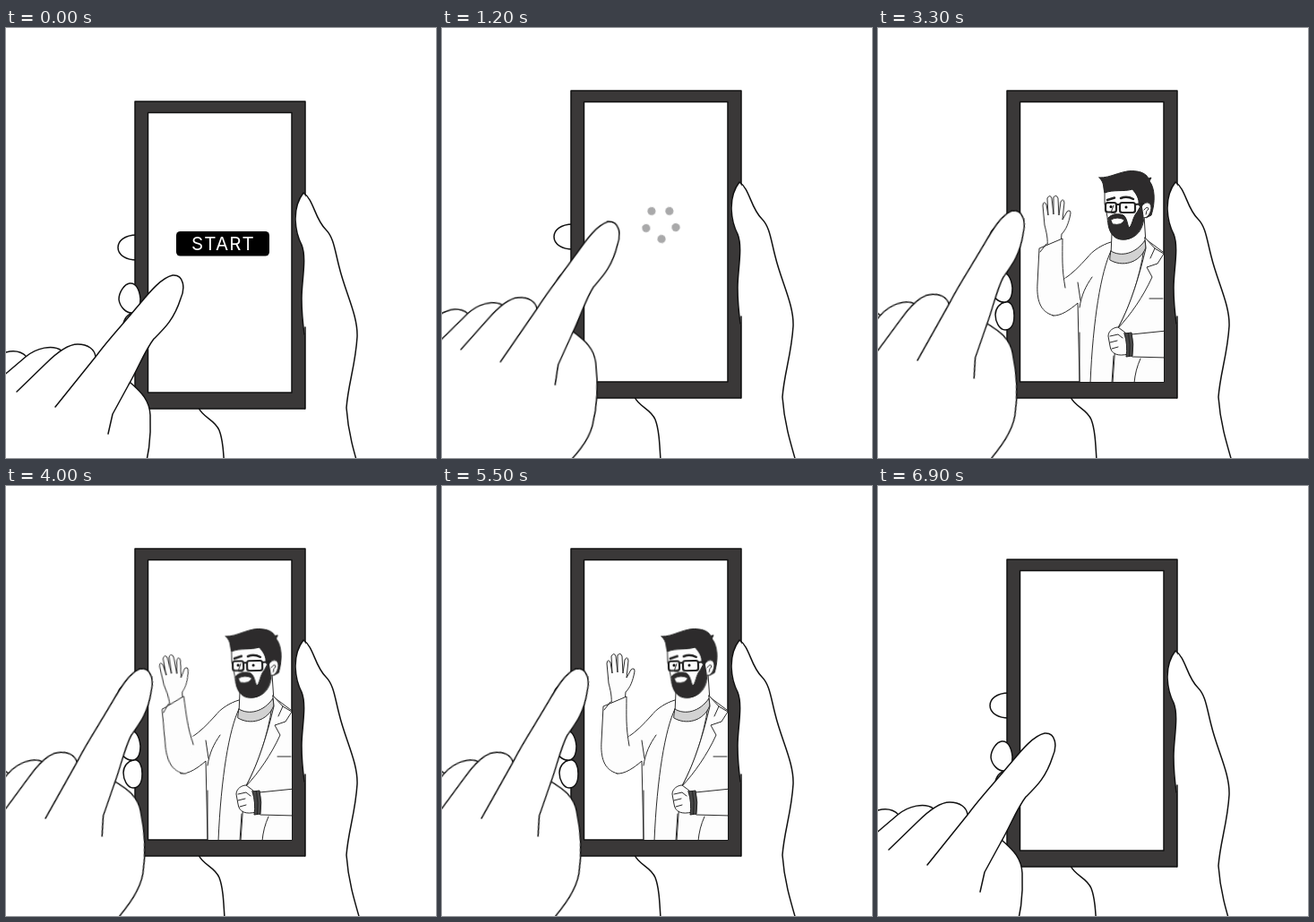
Write an HTML page that moves like this. It is 480 by 480 pixels and loops after 7 s.

```html
<!DOCTYPE html>
<html lang="en">
<head>
<meta charset="utf-8">
<title>Video call</title>
<style>
html, body { margin: 0; width: 100%; height: 100%; overflow: hidden; background: #fff; }
svg { display: block; width: 100vw; height: 100vh; }
path, rect { stroke-linejoin: round; stroke-linecap: round; }
.line { fill: #fff; stroke: #111; stroke-width: 1.5; }
.thin { fill: #fdfdfd; stroke: #2a2a2a; stroke-width: 1; }
.dark { fill: #2d2b2c; stroke: #222; stroke-width: 1; }
.open { fill: none; }
.bare { stroke: none; }
.collar { fill: #d2d2d2; }
text { font: 400 20.5px Inter, "Open Sans", sans-serif; letter-spacing: 1.2px; fill: #fff; text-anchor: middle; }

#device, #button, #loader, #man, #forearm, #head, #tap { animation: 7s ease-in-out infinite; }
#device { animation-name: lift; }
#button { animation-name: press; transform-origin: 242px 228.7px; }
#loader { animation-name: load; animation-timing-function: linear; }
#dots { animation: spin 1s linear infinite; transform-origin: 244px 218px; }
#man { animation-name: call; animation-timing-function: linear; }
#forearm { animation-name: wave; transform-origin: 194px 310px; }
#head { animation-name: nod; transform-origin: 282px 238px; }
#tap { animation-name: tap; transform-origin: 216px 226px; }

@keyframes lift {
  0%, 97.1%, 100% { transform: translateY(12px); }
  7.1%, 91.5% { transform: none; }
}
@keyframes press {
  0%, 5% { transform: none; opacity: 1; }
  8.3%, 9.3% { transform: translateY(3.8px) scale(.835); opacity: 1; }
  12.2% { transform: none; opacity: 1; }
  15%, 100% { transform: none; opacity: 0; }
}
@keyframes load {
  0%, 15.7% { opacity: 0; }
  18.5%, 37% { opacity: 1; }
  39%, 100% { opacity: 0; }
}
@keyframes spin { to { transform: rotate(360deg); } }
@keyframes call {
  0%, 38.6% { opacity: 0; }
  41.4%, 91.4% { opacity: 1; }
  94.3%, 100% { opacity: 0; }
}
@keyframes wave {
  0%, 46.8%, 61.4%, 78.6%, 100% { transform: translate(0, 0) rotate(0deg); }
  54%, 69%, 88% { transform: translate(5px, 1px) rotate(-13deg); }
}
@keyframes nod {
  0%, 47.1%, 88.6%, 100% { transform: none; }
  68.6% { transform: rotate(-3deg); }
}
@keyframes tap {
  0%, 97.1%, 100% { transform: translate(-28px, 50px) rotate(0deg); }
  8.3%, 12.1% { transform: translate(0, 0) rotate(0deg); }
  22.9%, 91.4% { transform: translate(-65px, -22px) rotate(-9.5deg); }
}
</style>
</head>
<body>
<svg viewBox="0 0 480 480">
  <defs>
    <clipPath id="screen"><rect x="159" y="83" width="160" height="312"/></clipPath>
  </defs>

  <g id="device">
    <!-- holding hand behind the phone -->
    <path class="line" d="M146 219C132 219 125 226 125 233C125 242 135 247 146 247"/>
    <path class="line open" d="M215 412C220 423 233 425 238 437C243 450 243 468 245 500"/>

    <rect x="144" y="70" width="190" height="343" fill="#3a3838" stroke="#111" stroke-width="1.5"/>
    <rect class="line" x="158.5" y="82.5" width="160.5" height="312.5"/>

    <g clip-path="url(#screen)">
      <g id="button">
        <rect x="190" y="215" width="104" height="27.5" rx="4.5"/>
        <text x="242.5" y="236">START</text>
      </g>

      <g id="loader">
        <g id="dots" fill="#58585a">
          <circle cx="234" cy="204.5" r="4.6"/>
          <circle cx="253.5" cy="203.2" r="4.6"/>
          <circle cx="261" cy="222.3" r="4.6"/>
          <circle cx="244.3" cy="235" r="4.6"/>
          <circle cx="228" cy="223.5" r="4.6"/>
        </g>
      </g>

      <g id="man">
        <!-- coat and shirt -->
        <path class="thin" d="M195 321C204 322 215 314 223 307L225 396H322V253L298 235L260 239C250 242 240 248 233 257C225 266 217 274 208 280Z"/>
        <path class="thin bare" d="M191 318L207 280L222 276V306L196 320Z"/>
        <path class="thin open" d="M239 278C232 288 227 298 225 312M223 284L226 304M225 340V396"/>
        <path class="thin" d="M260 249C249 272 240 325 237 396H262L266 338C280 315 292 280 297 246Z"/>
        <path class="thin" d="M261 230L260 253C274 262 290 254 299 240L297 210Z"/>
        <path class="thin collar" d="M260 249C271 256 288 252 298 237L299 245C292 263 272 267 259 259Z"/>
        <path class="thin" d="M298 234L309 246L319 252L312 263L300 267L306 278C296 300 282 320 268 335C283 307 292 275 299 246Z"/>
        <path class="thin open" d="M309 246L304 257M303 302L318 302M263 366L261 396M293 369C289 378 287 386 286 396"/>
        <!-- resting arm -->
        <path class="thin" d="M283 342L322 338V368L284 367Z"/>
        <path class="thin" d="M276 340L268 334C263 334 257 338 257 344L259 355C260 364 268 367 279 364Z"/>
        <path class="thin open" d="M259 344L268 342L273 346M259 351L267 349M261 358L268 356"/>
        <path d="M275 341L283 340Q286 353 284 366L277 367Q279 354 275 341Z" fill="#484848" stroke="#222"/>
        <path d="M279.500 341Q282 354 280.500 366" fill="none" stroke="#222"/>

        <g id="forearm">
          <path class="thin" d="M189 246C190 235 188 228 186 220L184 198Q185 192 188 197L190 209L189 190Q192 185 194 190L196 208L196 189Q199 185 201 190L202 209L204 194Q207 189 208 195L206 214L211 205Q215 202 215 207C213 218 210 225 205 230L204 242Z"/>
          <path class="thin" d="M196 321C180 317 177 302 178 285L180 246L206 235C206 256 205 268 209 290"/>
          <path class="thin open" d="M181 250L188 241"/>
        </g>

        <g id="head">
          <path class="thin" d="M253 178L253 196L256 211C257 230 264 237 275 236C289 235 296 225 297 211L298 180Z"/>
          <path class="dark" d="M247 167C260 168 274 157 289 160C296 161 300 164 302 168L305 167L303 171C309 178 310 194 305 209L299 212L295 199L291 198C292 190 288 185 284 180C275 183 263 180 253 184C251 177 253 173 247 167Z"/>
          <path class="thin" d="M294 200C297 193 305 193 305 201C304 209 299 214 295 211M297 203Q301 198 302 202Q299 204 299 208"/>
          <path class="dark" d="M257 212C261 207 269 207 274 209C278 212 278 218 280 223C284 221 284 211 289 206L294 197L296 210C296 224 288 234 277 236C266 237 260 231 258 223Z"/>
          <path class="thin" d="M260 214Q267 210 275 214Q273 221 262 219Z"/>
          <path class="thin open" d="M263 198L260 206L265 207"/>
          <path d="M256 192L264 189.500M271 190Q278 187 285 191" fill="none" stroke="#222" stroke-width="2.500"/>
          <g fill="none" stroke="#222" stroke-width="2.200">
            <rect x="254" y="195" width="12" height="10.500" rx="2.500"/>
            <rect x="270" y="195" width="17" height="11" rx="2.500"/>
            <path d="M266 197H270M287 197L296 196"/>
          </g>
          <circle cx="260" cy="199.500" r="1.500"/>
          <circle cx="277" cy="200" r="1.500"/>
        </g>
      </g>
    </g>

    <!-- holding hand in front of the phone -->
    <path class="line" d="M142 306C149 304 152 313 152 321C152 330 149 337 142 337C135 337 131 327 131 320C131 313 136 307 142 306Z"/>
    <path class="line" d="M138 273C145 272 149 280 150 290C150 299 147 305 142 306C134 307 127 299 126 291C126 283 132 274 138 273Z"/>
    <path class="line bare" d="M332 172C318 190 322 217 330 230C336 245 330 270 330 290C330 305 331 320 334 332V500H400L380 412L392 330L363 222Z"/>
    <path class="line open" d="M333 330C331 315 330 305 330 290C330 270 336 245 330 230C323 217 318 190 332 172C344 180 344 200 357 213C366 222 367 236 372 255C379 284 393 309 392 333C390 365 382 385 380 412C382 440 388 460 398 494"/>
    <path d="M334 322V413" stroke="#111" stroke-width="1.500"/>
  </g>

  <g id="tap">
    <path class="line bare" d="M-80 400L0 333L40 312L78 307L108 303L128 317L165 344L188 375V420L145 495L100 570H-80Z"/>
    <path class="line" d="M-30 366C-14 348 10 316 28 312C39 309 46 312 51 317"/>
    <path class="line" d="M10 351L50 317C62 307 80 303 90 310"/>
    <path class="line" d="M40 356L72 325C83 314 96 303 108 303C120 303 127 309 128 317"/>
    <path class="line" d="M165 344C174 353 188 362 189 382C190 405 187 431 180 452C174 469 160 483 140 500"/>
    <path class="line" d="M83 373L128 317C141 299 159 280 173 263C185 249 200 229 214 226C227 225 228 241 223 252C215 277 203 287 193 297C183 310 176 329 165 348L147 381L142 403"/>
  </g>
</svg>
</body>
</html>
```
